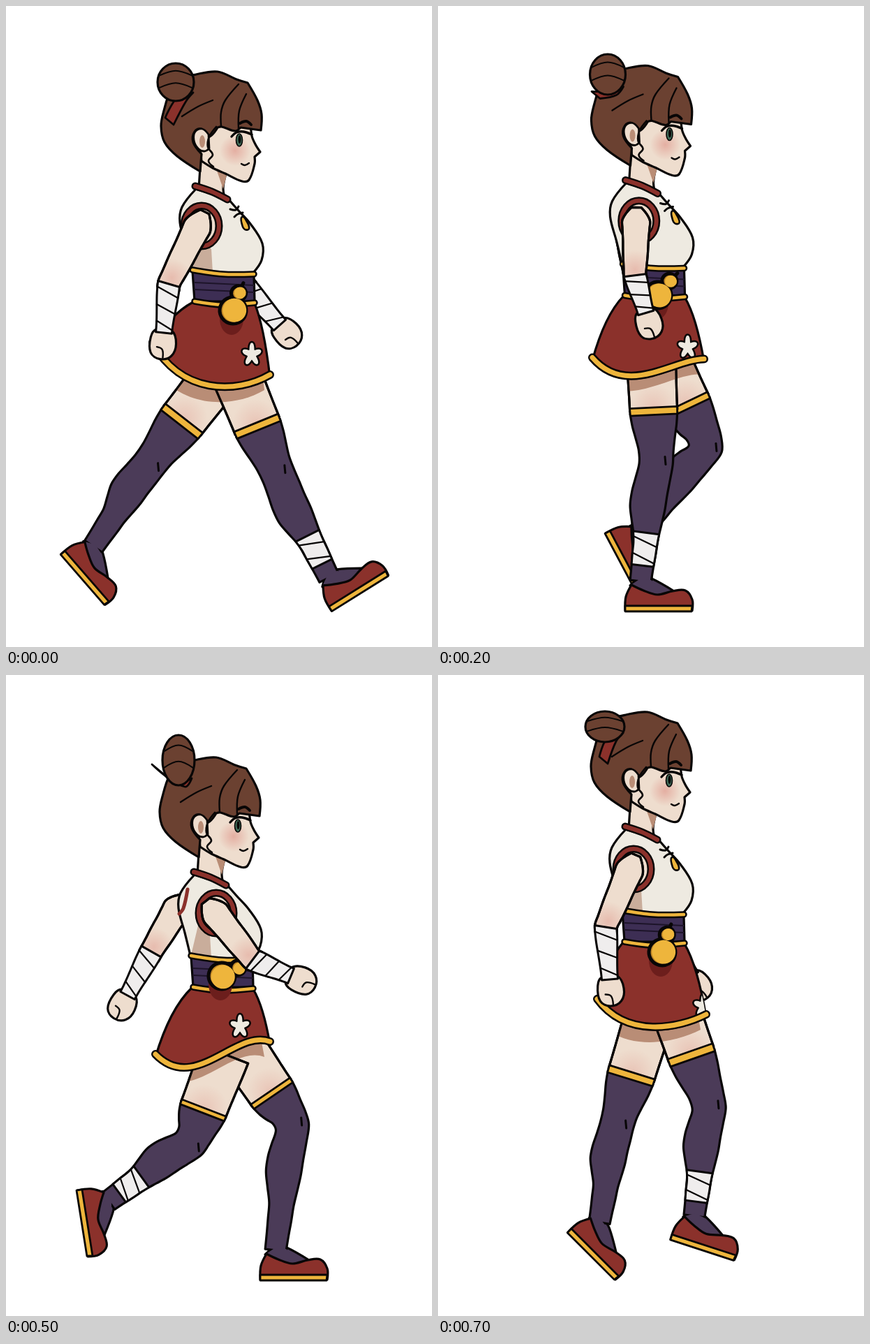
An HTML page with a canvas for the animation above (800 ms loop, 610x918 px).

```html
<!DOCTYPE html>
<html lang="en">
<head>
<meta charset="utf-8">
<title>Walk cycle</title>
<style>
html, body { margin: 0; width: 100%; height: 100%; overflow: hidden; background: #fff; }
canvas { display: block; }
</style>
</head>
<body>
<canvas id="stage" width="610" height="918"></canvas>
<script>
const ctx = document.getElementById('stage').getContext('2d');
const INK = '#080606', SKIN = '#eeddce', RED = '#8b312b', GOLD = '#eeb53c', HAIR = '#6b4131',
  SOCK = '#4b3b58', WRAP = '#efeded', CREAM = '#eeeae1', SHADE = '#b98d76', SASH = '#3d2e54';

// Joints of each pose. Leg: hip, knee, heel, foot angle. Arm: shoulder, elbow, wrist.
// Skirt: the hem as a cubic curve. Gourd: centre and tilt. Bun: centre and radii.
const contact = {
  lift: [0, 0],
  front: [[329, 526], [387, 668], [466, 866], -32],
  rear: [[303, 529], [207, 652], [79, 785], 49],
  armBack: [[276, 312], [233, 398], [226, 468]],
  armFront: [[297, 320], [341, 400], [392, 457]],
  skirt: [[210, 486], [250, 560], [330, 560], [378, 532]],
  gourd: [325, 436, 18], flower: [352, 499], bun: [243, 109, 26, 27], tail: [232, 166]
};
const down = {
  lift: [-2, 24],
  front: [[347, 550], [410, 642], [364, 866], 0],
  rear: [[302, 572], [265, 668], [102, 738], 81],
  armBack: [[261, 331], [208, 396], [174, 459]],
  armFront: [[297, 338], [353, 408], [408, 431]],
  skirt: [[214, 547], [270, 605], [330, 510], [378, 529]],
  gourd: [309, 431, 63], flower: [335, 503], bun: [249, 98, 23, 36], tail: [215, 110]
};
const up = {
  lift: [-3, -41],
  front: [[334, 462], [388, 616], [333, 808], 18],
  rear: [[300, 498], [256, 640], [186, 798], 45],
  armBack: [[276, 275], [240, 361], [246, 436]],
  armFront: [[301, 275], [327, 378], [363, 432]],
  skirt: [[228, 468], [270, 525], [345, 510], [384, 490]],
  gourd: [321, 397, 15], flower: [380, 474], bun: [242, 115, 28, 22], tail: [238, 164]
};

const middle = (a, b) => Array.isArray(a) ? a.map((v, i) => middle(v, b[i])) : (a + b) / 2;
const passing = {};
for (const key in down) passing[key] = middle(down[key], up[key]);
passing.armBack = passing.armFront = middle(passing.armBack, passing.armFront);
passing.rear = [[305, 500], [312, 650], [268, 866], 0];
passing.front = [[325, 505], [385, 630], [240, 755], 62];

const poses = [contact, down, passing, up];

// Half widths along a limb, behind and before the bone: 0 = root, 1 = middle joint, 2 = end.
const LEG = [[-.3, 36, 36], [.52, 34, 34], [1, 23, 25], [1.35, 29, 22], [1.7, 17, 17], [2, 15, 15]];
const ARM = [[-.2, 7, 7], [0, 20, 20], [.5, 18, 18], [1, 16, 16], [2, 11.5, 11.5]];

const clamp = v => Math.min(1, Math.max(0, v));
const lerp = (a, b, k) => [a[0] + (b[0] - a[0]) * k, a[1] + (b[1] - a[1]) * k];
const angle = (a, b) => Math.atan2(b[1] - a[1], b[0] - a[0]);

// A limb gives its two edge points at any place along the bones.
function limb(a, b, c, profile) {
  const t1 = angle(a, b), t2 = angle(b, c);
  return s => {
    const i = Math.max(1, profile.findIndex(p => p[0] >= s)), p = profile[i - 1], q = profile[i];
    const u = clamp((s - p[0]) / (q[0] - p[0])), k = u * u * (3 - 2 * u);
    const [x, y] = s < 1 ? lerp(a, b, s) : lerp(b, c, s - 1);
    const t = t1 + (t2 - t1) * clamp((s - .75) * 2);
    const back = p[1] + (q[1] - p[1]) * k, front = p[2] + (q[2] - p[2]) * k;
    return [[x - Math.sin(t) * back, y + Math.cos(t) * back].map((v, j) => 2 * (j ? y : x) * 0 + v),
      [x + Math.sin(t) * front, y - Math.cos(t) * front]];
  };
}

function section(edge, from, to) {
  const n = Math.ceil((to - from) * 8), back = [], front = [];
  for (let i = 0; i <= n; i++) {
    const [b, f] = edge(from + (to - from) * i / n), corner = i === 0 || i === n;
    back.push([...b, corner]);
    front.unshift([...f, corner]);
  }
  return back.concat(front);
}

// Points are "x,y" pairs; a trailing "!" makes a sharp corner.
const parse = s => Array.isArray(s) ? s
  : s.split(' ').map(p => [...p.split(',').map(parseFloat), p.endsWith('!')]);

function handle(prev, at, next, to) {
  if (at[2]) return at;
  const dx = next[0] - prev[0], dy = next[1] - prev[1];
  const k = Math.hypot(to[0] - at[0], to[1] - at[1]) / (3 * (Math.hypot(dx, dy) || 1));
  return [at[0] + dx * k, at[1] + dy * k];
}

function curve(s, open) {
  const p = parse(s), n = p.length, path = new Path2D();
  if (open) p[0][2] = p[n - 1][2] = true;
  path.moveTo(p[0][0], p[0][1]);
  for (let i = 0; i < (open ? n - 1 : n); i++) {
    const a = p[(i + n - 1) % n], b = p[i], c = p[(i + 1) % n], d = p[(i + 2) % n];
    path.bezierCurveTo(...handle(a, b, c, c).slice(0, 2), ...handle(d, c, b, b).slice(0, 2), c[0], c[1]);
  }
  if (!open) path.closePath();
  return path;
}

function ink(path, width = 3.2, color = INK) {
  ctx.lineWidth = width;
  ctx.strokeStyle = color;
  ctx.stroke(path);
}
function paint(path, fill, width = 3.2) {
  ctx.fillStyle = fill;
  ctx.fill(path);
  if (width) ink(path, width);
  return path;
}
const shape = (s, fill, width) => paint(curve(s), fill, width);
const line = (s, width = 2.4, color) => ink(curve(s, true), width, color);
function band(path, color, width) {
  ink(path, width + 5);
  ink(path, width, color);
}
function oval(x, y, rx, ry = rx) {
  const path = new Path2D();
  path.ellipse(x, y, rx, ry, 0, 0, 7);
  return path;
}
function blush(x, y, r, alpha) {
  const g = ctx.createRadialGradient(x, y, 0, x, y, r);
  g.addColorStop(0, `rgba(214,110,100,${alpha})`);
  g.addColorStop(1, 'rgba(214,110,100,0)');
  paint(oval(x, y, r), g, 0);
}
function saved(draw) {
  ctx.save();
  draw();
  ctx.restore();
}
const clipped = (path, draw) => saved(() => { ctx.clip(path); draw(); });
const placed = (x, y, turn, draw) => saved(() => { ctx.translate(x, y); ctx.rotate(turn); draw(); });

function bandage(edge, from, to, turns) {
  shape(section(edge, from, to), WRAP, 3);
  const step = (to - from) / turns;
  for (let i = 0; i < turns; i++) {
    const s = from + i * step;
    line([edge(s + step * .3)[0], edge(s + step * .8)[1]], 2.2);
  }
}

function drawLeg([hip, knee, [x, y], degrees], wrapped, skirt) {
  const turn = degrees * Math.PI / 180, cos = Math.cos(turn), sin = Math.sin(turn);
  const ankle = [x + 22 * cos + 42 * sin, y + 22 * sin - 42 * cos];
  const edge = limb(hip, knee, ankle, LEG);
  const skin = shape(section(edge, -.3, .53), SKIN);
  clipped(skin, () => {
    blush(...lerp(hip, knee, .5), 34, .22);
    ctx.translate(-8, 18);
    paint(skirt, SHADE, 0);
  });
  ink(skin);
  placed(x, y, turn, () => shape('7,-36! 22,-50! 38,-46 70,-28! 46,-15 20,-20', SOCK));
  shape(section(edge, .55, 2), SOCK);
  placed(x, y, turn, () => shape('10,-38! 22,-46! 37,-44! 48,-26 26,-26', SOCK, 0));
  shape(section(edge, .5, .57), GOLD, 2.8);
  if (wrapped) bandage(edge, 1.6, 1.87, 2);
  placed(x, y, turn, () => {
    shape('0,0! 1,-20 9,-37! 26,-29 46,-23 68,-28 86,-29 96,-16 96,0!', RED);
    shape('0,-7! 96,-7! 95,1! 0,1!', GOLD, 2.8);
  });
  const [kx, ky] = lerp(...edge(1), .75);
  line([[kx, ky - 5], [kx + 1, ky + 6]], 3);
}

function drawArm([shoulder, elbow, wrist]) {
  const edge = limb(shoulder, elbow, wrist, ARM);
  const skin = shape(section(edge, -.2, 1.1), SKIN);
  clipped(skin, () => blush(...lerp(shoulder, elbow, .9), 28, .3));
  ink(skin);
  placed(...wrist, angle(elbow, wrist), () => {
    shape('-4,-11 14,-19 32,-14 38,2 30,16 8,18 -4,11', SKIN);
    line('36,-2 24,0 21,8');
  });
  bandage(edge, 1, 2, 3);
}

function skirtPath([l, c, d, r], [dx, dy]) {
  const path = new Path2D(), wl = [268 + dx, 424 + dy], wr = [356 + dx, 426 + dy];
  const side = (w, p) => [w[0] * .4 + p[0] * .6, w[1] * .7 + p[1] * .3];
  path.moveTo(...wl);
  path.quadraticCurveTo(...side(wl, l), ...l);
  path.bezierCurveTo(...c, ...d, ...r);
  path.quadraticCurveTo(...side(wr, r), ...wr);
  path.closePath();
  return path;
}

function drawFlower([x, y]) {
  const path = new Path2D();
  for (let a = 0; a < 6.3; a += .1) {
    const r = 12 * (.85 + .32 * Math.cos(5 * a));
    path.lineTo(x + r * Math.sin(a), y - 1.2 * r * Math.cos(a));
  }
  path.closePath();
  ink(path, 5);
  paint(path, CREAM, 0);
}

function drawGourd([x, y, tilt]) {
  paint(oval(x - 2, y + 12, 17, 23), '#6c1e1c', 0);
  placed(x, y, tilt * Math.PI / 180, () => {
    const bulbs = [[0, 19], [-26, 10.5]];
    line('0,-26 2,-42', 5);
    for (const [v, r] of bulbs) paint(oval(0, v, r), '#bd8325', 5);
    for (const [v, r] of bulbs) paint(oval(2, v - 1, r - 2), GOLD, 0);
  });
}

function drawTorso(turned) {
  shape('272,262! 252,288 249,310 258,345 266,378! 310,384 354,382! 366,364 367,340 350,312 332,292 318,276! 297,270', CREAM);
  shape('277,335! 294,348! 296,382! 267,377!', '#c9ad9b', 0);
  if (turned) line('262,283 256,310 250,318', 5, RED);
  else {
    line('321,291 329,292 333,287', 3);
    line('327,302 332,298 339,296', 3);
    shape('338,302 345,309 348,319 342,320 338,313', GOLD, 2.6);
  }
}

function drawSash() {
  shape('267,380! 355,386! 356,423! 270,423!', SASH);
  for (const y of [398, 408]) line([[270, y - 2], [355, y + 2]], 2, '#1d1429');
  band(curve('267,378 310,384 355,384', true), GOLD, 4.5);
  band(curve('270,423 310,428 356,425', true), GOLD, 4.5);
  band(curve('271,258 295,266 317,277', true), RED, 6);
}

function drawNeck() {
  shape('279,215! 276,262! 300,285! 316,285! 311,262 315,240!', SKIN);
  shape('302,236! 316,242! 311,262!', SHADE, 0);
}

function drawHead([bx, by, rx, ry], tail) {
  const face = shape('300,150! 350,165! 352,186 357,198 364,209! 356,216! 356,226 348,249 338,251 314,240 296,232 280,222! 275,180!', SKIN);
  clipped(face, () => blush(328, 207, 22, .42));
  paint(oval(334, 192, 4.5, 9), '#3f6b58', 1.6);
  paint(oval(334.5, 191, 2, 6), INK, 0);
  line('323,187 330,181 340,180 352,184', 3.4);
  line('337,226 342,228 348,225');
  shape('236,120 226,150 222,172 227,195 245,215 278,237! 280,212! 268,195 270,180 280,176 289,188 303,174! 309,173 328,179 336,174! 365,178! 366,155 360,135 346,110! 330,105 303,94 272,98 250,105', HAIR);
  shape('290,184! 281,176 271,180 269,192 275,204 284,208 291,204!', SKIN, 2.8);
  paint(oval(281, 194, 4, 9), SHADE, 0);
  line('301,173 291,187 289,202 296,213 290,222 297,230', 2.6);
  line('333,112 314,135 308,152 308,172');
  line('344,126 334,150 333,176');
  line('296,135 275,144 252,158');
  line('335,168 344,165 351,170', 4);
  const [tx, ty] = tail;
  shape([[268, 124, true], [258, 136], [tx + 8, ty + 4, true], [tx - 4, ty - 6, true], [246, 130]], RED, 2.8);
  placed(bx, by, 0, () => {
    paint(oval(0, 0, rx, ry), HAIR);
    for (const k of [-.35, .3]) line([[-.9 * rx, k * ry], [0, (k - .25) * ry], [.9 * rx, k * ry]], 2);
  });
}

function drawStep(step) {
  const pose = poses[step % 4], [dx, dy] = pose.lift;
  const nearRear = step > 1 && step < 6;
  const ahead = step > 2 && step < 6;
  const [near, far] = ahead ? [pose.armFront, pose.armBack] : [pose.armBack, pose.armFront];
  const skirt = skirtPath(pose.skirt, pose.lift);
  const lifted = draw => placed(dx, dy, 0, draw);

  ctx.fillStyle = '#fff';
  ctx.fillRect(0, 0, 610, 918);
  drawArm([[far[0][0] - 14, far[0][1]], far[1], far[2]]);
  drawLeg(nearRear ? pose.front : pose.rear, false, skirt);
  drawLeg(nearRear ? pose.rear : pose.front, true, skirt);

  lifted(() => { drawNeck(); drawTorso(ahead && step % 4); });
  paint(skirt, RED);
  clipped(skirt, () => drawFlower(pose.flower));
  const hem = new Path2D(), [l, c, d, r] = pose.skirt.map(([x, y]) => [x, y - 4]);
  hem.moveTo(...l);
  hem.bezierCurveTo(...c, ...d, ...r);
  band(hem, GOLD, 7);
  lifted(drawSash);
  drawGourd(pose.gourd);
  lifted(() => drawHead(pose.bun, pose.tail));

  const [sx, sy] = near[0], hole = oval(sx + 4, sy + 3, 25, 29);
  paint(hole, SKIN, 0);
  band(hole, RED, 6);
  drawArm(near);
}

ctx.lineCap = ctx.lineJoin = 'round';
function tick(now) {
  drawStep(Math.floor(now / 100) % 8);
  requestAnimationFrame(tick);
}
requestAnimationFrame(tick);
</script>
</body>
</html>
```
